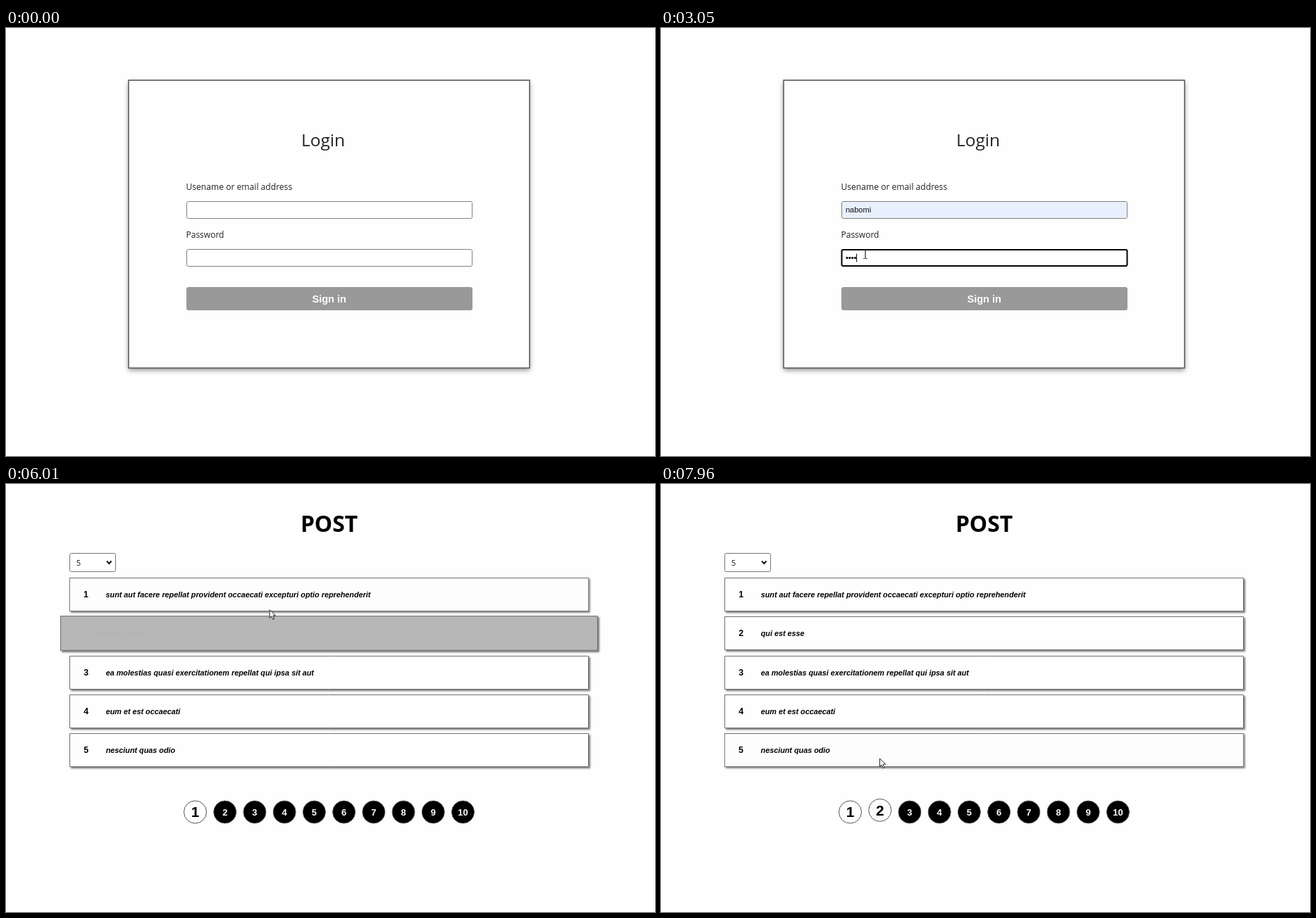
Write an HTML page with a canvas that moves like this. It is 921 by 608 pixels and loops after 8 s.

```html
<!DOCTYPE html>
<html lang="en">
<head>
<meta charset="utf-8">
<title>Login and posts</title>
<style>
html, body { margin: 0; width: 100%; height: 100%; overflow: hidden; background: #fefefe; }
canvas { display: block; }
</style>
</head>
<body>
<canvas id="stage" width="921" height="608"></canvas>
<script>
const LOOP = 8000, W = 921, H = 608;
const main = document.getElementById('stage').getContext('2d');
const layer = new OffscreenCanvas(W, H).getContext('2d');
let ctx = main;

const UI = '"Open Sans", "Noto Sans", sans-serif';
const ARIAL = '"Liberation Sans", Arial, sans-serif';
const KR = '"Noto Sans CJK KR", "Noto Sans CJK", "Noto Sans CJK JP", sans-serif';
const PAPER = '#fefefe';
const USER = 'nabomi';
const SAVED = ['bom40386', USER, 'mulgyeo4@bo.example', 'nabomi4038@mo.example', 'kolbuderan'];
const POSTS = [
  'sunt aut facere repellat provident occaecati excepturi optio reprehenderit',
  'qui est esse',
  'ea molestias quasi exercitationem repellat qui ipsa sit aut',
  'eum et est occaecati',
  'nesciunt quas odio'
];

// Moments when the state switches
const T = {
  enter: 50, focusUser: 390, suggest: 690, preview: 1220, pick: 1610, focusPass: 2120,
  typePass: 2570, posts: 4050, list: 4220, confirm: 5600, page: 7330
};
const HOVER_MS = 300, LAG_MS = 50;

// Pointer moves: from time, to time, x, y
const MOVES = [
  [50, 390, 310, 258], [690, 1310, 372, 328], [1560, 1770, 291, 318], [2000, 2170, 290, 321],
  [3390, 3950, 357, 373.5], [4370, 5000, 613, 186], [5040, 5190, 577, 199.5],
  [5690, 6310, 190, 160], [6410, 6720, 178, 222.5], [6720, 7080, 300, 400],
  [7190, 7400, 311, 467], [7800, 8080, 310, 340]
];

const clamp = u => Math.min(1, Math.max(0, u));
const smooth = u => u * u * (3 - 2 * u);
const fade = (t, on, onMs, off, offMs) => Math.min(clamp((t - on) / onMs), 1 - clamp((t - off) / offMs));
const inside = (p, x, y, w, h) => p.x >= x && p.x <= x + w && p.y >= y && p.y <= y + h;

function pointer(t) {
  const p = { x: 330, y: 573 };
  for (const [a, b, x, y] of MOVES) {
    const u = smooth(clamp((t - a) / (b - a)));
    p.x += (x - p.x) * u;
    p.y += (y - p.y) * u;
  }
  return p;
}

const rowTop = i => Math.floor(133.5 + i * 55.25) + .5;
const pageX = i => 268.5 + i * 42.22;
const overRow = (t, i) => t >= T.confirm && inside(pointer(t), 90, rowTop(i), 737, 47);

function overPage(t, i) {
  const p = pointer(t);
  return t >= T.confirm && Math.hypot(p.x - pageX(i), p.y - 466) < 16.5;
}

// Share of the last HOVER_MS spent over a thing, eased
function hover(t, test, i) {
  const step = 6;
  let n = 0;
  for (let d = 0; d < HOVER_MS; d += step) n += test(t - d, i);
  return smooth(n * step / HOVER_MS);
}

function grey(v) {
  const n = Math.round(v);
  return `rgb(${n},${n},${n})`;
}

function text(s, x, y, font, color, align = 'left') {
  ctx.font = font;
  ctx.fillStyle = color;
  ctx.textAlign = align;
  ctx.fillText(s, x, y);
}

function paint(fill, stroke, width = 1) {
  if (fill) { ctx.fillStyle = fill; ctx.fill(); }
  if (stroke) { ctx.strokeStyle = stroke; ctx.lineWidth = width; ctx.stroke(); }
}

function box(x, y, w, h, r, fill, stroke, width) {
  ctx.beginPath();
  ctx.roundRect(x, y, w, h, r);
  paint(fill, stroke, width);
}

function disc(x, y, r, fill, stroke, width) {
  ctx.beginPath();
  ctx.arc(x, y, r, 0, Math.PI * 2);
  paint(fill, stroke, width);
}

function poly(points, fill, stroke, width) {
  ctx.beginPath();
  points.forEach(([x, y]) => ctx.lineTo(x, y));
  ctx.closePath();
  paint(fill, stroke, width);
}

function line(points, color, width = 1) {
  ctx.beginPath();
  points.forEach(([x, y]) => ctx.lineTo(x, y));
  paint(null, color, width);
}

function star(x, y, r, color, width) {
  for (let i = 0; i < 3; i++) {
    const a = Math.PI / 6 + i * Math.PI / 3, dx = r * Math.cos(a), dy = r * Math.sin(a);
    line([[x - dx, y - dy], [x + dx, y + dy]], color, width);
  }
}

function shadow(color, x, y, blur) {
  ctx.shadowColor = color;
  ctx.shadowOffsetX = x;
  ctx.shadowOffsetY = y;
  ctx.shadowBlur = blur;
}
const noShadow = () => shadow('transparent', 0, 0, 0);

// Draws a whole group with one opacity
function group(alpha, drawing) {
  if (alpha <= 0) return;
  ctx = layer;
  ctx.clearRect(0, 0, W, H);
  ctx.save();
  drawing();
  ctx.restore();
  ctx = main;
  ctx.globalAlpha = alpha;
  ctx.drawImage(layer.canvas, 0, 0);
  ctx.globalAlpha = 1;
}

function field(y, focus, fill) {
  if (focus) box(256.5, y + 1, 405, 23, 2, fill, '#000', 2);
  else box(256.5, y + .5, 405, 24, 2, fill, '#808080');
}

const caret = (x, y) => line([[x, y - 6], [x, y + 6]], '#000');

function login(t) {
  shadow('rgba(0,0,0,.45)', 0, 3, 7);
  box(174, 74, 569, 409, 0, PAPER);
  noShadow();
  box(174, 74.25, 569, 408.75, 0, null, '#555', 1.5);
  text('Login', 450, 168, '24.5px ' + UI, '#222', 'center');
  text('Usename or email address', 255.5, 230, '12.1px ' + UI, '#222');
  text('Password', 255.5, 297.5, '12px ' + UI, '#222');

  const filled = t >= T.preview, onPass = t >= T.focusPass;
  const onUser = t >= T.focusUser && !onPass;
  field(246, onUser, filled ? '#e8f0fe' : '#fff');
  field(314, onPass, '#fff');
  if (filled) text(USER, 262, 262, '11px ' + ARIAL, '#111');
  if (onUser) {
    ctx.font = '11px ' + ARIAL;
    const w = t >= T.pick ? ctx.measureText(USER).width : 0;
    const wave = Array.from({ length: Math.floor(w) }, (_, x) => [262 + x, 264.3 + .6 * Math.sin(x * 1.6)]);
    line(wave, '#e04444');
    caret(262.5 + w, 258.5);
  }
  if (onPass) {
    const n = Math.max(0, Math.min(4, Math.floor((t - T.typePass) / 160) + 1));
    for (let i = 0; i < n; i++) disc(264 + i * 3.85, 326.5, 1.6, '#000');
    caret(262.2 + n * 3.85, 326.5);
  }
  box(256, 368, 406, 33, 3, '#999');
  text('Sign in', 458.7, 389.5, 'bold 14.5px ' + ARIAL, '#fff', 'center');
  group(fade(t, T.suggest, 170, 1640, 180), () => savedList(filled));
}

function savedList(over) {
  shadow('rgba(0,0,0,.5)', 0, 1, 3);
  ctx.beginPath();
  ctx.roundRect(339, 281, 160, 147, 6);
  ctx.moveTo(349, 281);
  ctx.lineTo(355.5, 275);
  ctx.lineTo(362, 281);
  paint('#292a2d');
  noShadow();
  if (over) box(339, 312, 160, 28, 0, '#333438');
  SAVED.forEach((s, i) => text(s, 348, 301 + i * 28.2, '9px ' + UI, '#f4f4f4'));
  if (over) {
    line([[478.5, 323], [484.5, 329]], '#f4f4f4', 1.2);
    line([[484.5, 323], [478.5, 329]], '#f4f4f4', 1.2);
  }
}

function row(i, p) {
  const y = rowTop(i), cy = y + 23.5, ink = grey(255 * p), s = 1 + .05 * p;
  ctx.save();
  ctx.translate(458.75, cy);
  ctx.scale(s, s);
  ctx.translate(-458.75, -cy);
  shadow('rgba(0,0,0,.55)', 2, 2, 2.5);
  box(90, y - .5, 737, 48, 0, grey(254 - 101 * p));
  noShadow();
  box(90.5, y, 736, 47, 0, null, '#707070');
  text(i + 1, 113.7, cy + 4.2, 'bold 12.3px ' + ARIAL, ink, 'center');
  text(POSTS[i], 141.7, cy + 4, 'italic bold 10.8px ' + ARIAL, ink);
  ctx.restore();
}

function pager(t) {
  for (let i = 0; i < 10; i++) {
    const lit = i === 0 || (i === 1 && t >= T.page);
    const y = 466 - 3.5 * hover(t, overPage, i);
    disc(pageX(i), y, 16, lit ? PAPER : '#000', '#555');
    text(i + 1, pageX(i), y + (lit ? 7.4 : 4.5), `bold ${lit ? 20.8 : 12.9}px ${ARIAL}`, lit ? '#000' : '#fff', 'center');
  }
}

function posts(t) {
  text('POST', 458.5, 68, 'bold 31.8px ' + UI, '#000', 'center');
  box(90.5, 98.5, 65, 26, 2, '#fff', '#767676');
  text('5', 99.7, 115.7, '11.2px ' + UI, '#111');
  line([[143, 109.5], [146.3, 113], [149.6, 109.5]], '#111', 1.9);
  if (t < T.list) return;
  POSTS.forEach((_, i) => row(i, hover(t, overRow, i)));
  pager(t);
  const a = fade(t, 4250, 150, 5680, 200);
  group(a, () => dialog(1 - a, t < T.confirm));
}

function dialogArt() {
  const edge = '#4b4c4e', blue = '#8ab4f8';
  ctx.lineCap = 'round';
  star(319, 27, 7.5, '#5a5b5d', 2.5);
  ctx.beginPath();
  ctx.moveTo(277, 40);
  ctx.bezierCurveTo(304, 28, 308, 50, 322, 56);
  ctx.bezierCurveTo(333, 61, 341, 59, 350, 53);
  ctx.moveTo(485, 22);
  ctx.bezierCurveTo(500, 2, 516, 20, 536, -2);
  paint(null, edge, 4);
  ctx.lineCap = 'butt';
  box(422, 8, 61, 39, 2, '#2d2e30', edge);
  box(367.5, -8, 55, 82, 6, '#333436', edge);
  line([[376, 6], [408, 6]], edge, 2);
  ctx.beginPath();
  ctx.arc(615, 40, 7.5, Math.PI, 0);
  paint(edge);
  poly([[395, 20], [377, 51], [414, 51]], '#f28b82', '#f28b82', 2);
  line([[395.3, 32], [395.3, 42]], '#333', 2.4);
  disc(395.3, 46, 1.5, '#333');
  for (let k = 0; k < 3; k++) star(420 + k * 11, 39, 4, blue, 1.6);
  line([[452, 33], [452, 46]], blue, 1.6);
}

// k: 0 fully open, 1 gone; the lower edge flares as it tilts
function dialog(k, ring) {
  const d = 5.2 * Math.sqrt(k), s = 1 + .012 * k;
  const left = 275.8 - d, right = 641 + d, low = 229.5;
  const body = new Path2D();
  body.moveTo(275.8, -10);
  body.lineTo(left, low - 9);
  body.quadraticCurveTo(left, low, left + 9, low);
  body.lineTo(right - 9, low);
  body.quadraticCurveTo(right, low, right, low - 9);
  body.lineTo(641, -10);
  body.closePath();

  ctx.translate(0, -3 * k);
  shadow('rgba(0,0,0,.45)', 0, 1, 3);
  ctx.fillStyle = '#2a2928';
  ctx.fill(body);
  noShadow();
  ctx.save();
  ctx.clip(body);
  box(260, -10, 400, 91, 0, '#272829');
  ctx.translate(458.5 * (1 - s), 0);
  ctx.scale(s, 1);
  dialogArt();
  ctx.restore();
  ctx.strokeStyle = '#5c5c5c';
  ctx.lineWidth = 1;
  ctx.stroke(body);

  ctx.translate(458.5 * (1 - s), 0);
  ctx.scale(s, 1);
  text('비밀번호 변경', 291.5, 112.8, '13.5px ' + KR, '#e3e3e3');
  text('방금 사용한 비밀번호가 정보 유출로 인해 노출된 것으로 확인됩니다. 지금 바로 비', 291.5, 142.3, '10.1px ' + KR, '#c7c7c7');
  text('밀번호를 변경하는 것이 좋습니다.', 291.5, 158, '10.1px ' + KR, '#c7c7c7');
  disc(300, 197.5, 5.3, null, '#d0d0d0', 1.2);
  line([[300, 196.8], [300, 200.5]], '#d0d0d0', 1.3);
  disc(300, 194.8, .8, '#d0d0d0');
  if (ring) box(570.5, 179.5, 57, 35, 17.5, null, '#d3e3fd', 2);
  box(573, 182.3, 52, 29.7, 14.8, '#a8c7fa');
  text('확인', 599, 200.7, '10.4px ' + KR, '#3f5375', 'center');
}

function arrow() {
  poly([[0, 0], [0, 11.5], [2.7, 9], [4.6, 13.6], [6.6, 12.7], [4.7, 8.3], [8.3, 8.1]], '#fff', '#222');
}

function beam() {
  for (const s of [-1, 1]) {
    line([[-2.8, 6.5 * s], [-.8, 6.5 * s], [0, 5.5 * s], [.8, 6.5 * s], [2.8, 6.5 * s]], '#222');
  }
  line([[0, -5.5], [0, 5.5]], '#222', 1.2);
}

function hand() {
  ctx.beginPath();
  ctx.moveTo(-1.3, 10);
  ctx.lineTo(-1.3, 1.2);
  ctx.quadraticCurveTo(0, -.8, 1.3, 1.2);
  ctx.lineTo(1.3, 5.6);
  ctx.quadraticCurveTo(3, 4.8, 3.8, 6.2);
  ctx.quadraticCurveTo(5.4, 5.6, 6.1, 7);
  ctx.quadraticCurveTo(7.9, 6.8, 8, 8.5);
  ctx.lineTo(8, 12);
  ctx.quadraticCurveTo(7.8, 14, 6.5, 15.3);
  ctx.lineTo(6.5, 17.5);
  ctx.lineTo(-.3, 17.5);
  ctx.lineTo(-.3, 15.5);
  ctx.lineTo(-4, 10.6);
  ctx.quadraticCurveTo(-4, 8.2, -1.3, 10);
  ctx.closePath();
  paint('#fff', '#222');
  [1.3, 3.8, 6.1].forEach(x => line([[x, 6.5], [x, 9.5]], '#222', .8));
}

function shape(t) {
  const p = pointer(t);
  if (t >= T.posts) {
    const link = POSTS.some((_, i) => overRow(t, i)) || overPage(t, 1);
    return link ? hand : arrow;
  }
  if (inside(p, 256, 368, 406, 33)) return hand;
  const listed = t >= T.suggest && t < T.pick;
  const onField = inside(p, 256, 246, 406, 25) || (!listed && inside(p, 256, 314, 406, 25));
  return onField ? beam : arrow;
}

function cursor(t) {
  if (t < T.enter) return;
  const p = pointer(t);
  ctx.save();
  ctx.translate(p.x, p.y);
  shape(t - LAG_MS)();
  ctx.restore();
}

function draw(t) {
  ctx.fillStyle = PAPER;
  ctx.fillRect(0, 0, W, H);
  (t < T.posts ? login : posts)(t);
  cursor(t);
}

let start;
function tick(now) {
  if (start === undefined) start = now;
  draw((now - start) % LOOP);
  requestAnimationFrame(tick);
}
draw(0);
requestAnimationFrame(tick);
</script>
</body>
</html>
```
